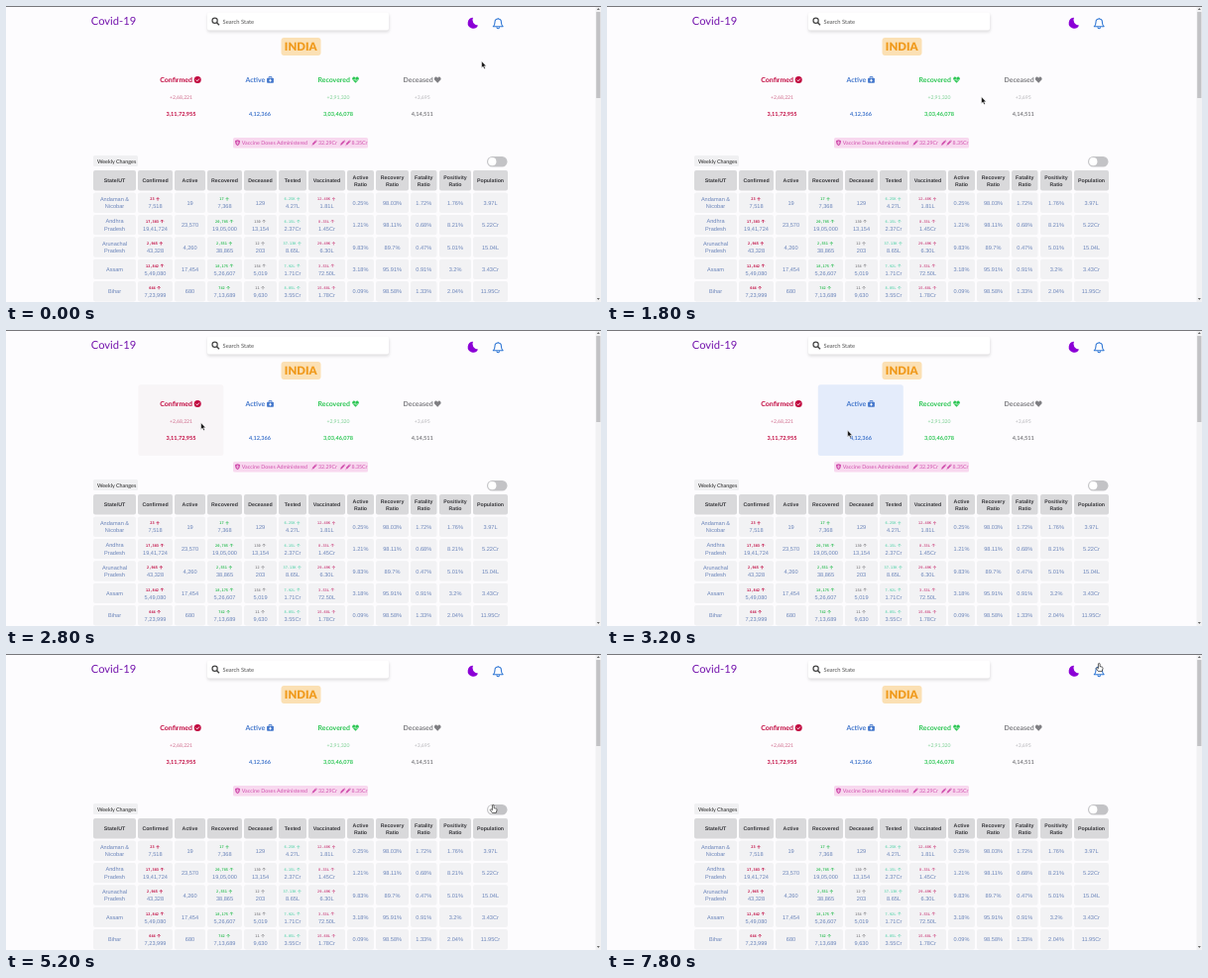
An HTML page for the animation above (8000 ms loop, 600 by 299 pixels).

```html
<!DOCTYPE html>
<html lang="en">
<head>
<meta charset="utf-8">
<title>Covid-19 dashboard</title>
<style>
html, body { margin: 0; width: 100%; height: 100%; overflow: hidden; background: #fdfcfe; }
svg { display: block; width: 100%; height: 100%; font-family: Lato, sans-serif; text-rendering: geometricPrecision; }
.mid { text-anchor: middle; }
.table { font: 5.6px "Liberation Sans", Arial, sans-serif; fill: #6a84ba; }
.head { font-weight: bold; font-size: 5.25px; fill: #38383c; }
.delta { font: bold 3.6px "DejaVu Sans Mono", monospace; }
</style>
</head>
<body>
<svg id="stage" viewBox="0 0 600 299"></svg>
<script>
const LOOP = 8000, STEP = 200;
const RED = '#c1073f', BLUE = '#4377cc', GREEN = '#2bc653', GRAY = '#7f7f83', PINK = '#d04fad';

const text = (x, y, value, attrs = '') => `<text x="${x}" y="${y}" ${attrs}>${value}</text>`;
const rect = (x, y, w, h, fill, rx = 0, attrs = '') =>
  `<rect x="${x}" y="${y}" width="${w}" height="${h}" fill="${fill}" rx="${rx}" ${attrs}/>`;
const path = (d, attrs) => `<path d="${d}" ${attrs}/>`;
const at = (x, y, content, attrs = '') => `<g transform="translate(${x} ${y})" ${attrs}>${content}</g>`;
const style = (size, fill, weight = 400) => `font-size="${size}" fill="${fill}" font-weight="${weight}"`;

const heart = fill => path('M0 3.2L-3.2 0Q-4-2-2.4-2.9Q-.9-3.3 0-1.8Q.9-3.3 2.4-2.9Q4-2 3.2 0Z', `fill="${fill}"`);
const icons = {
  check: `<circle r="3.5" fill="${RED}"/>` + path('M-1.6 0L-.4 1.2L1.7-1.1', 'fill="none" stroke="#fff" stroke-width=".9"'),
  medkit: rect(-3.4, -1.9, 6.8, 5, BLUE, .7) +
    path('M-1.4-2V-3H1.4V-2', `fill="none" stroke="${BLUE}" stroke-width=".9"`) +
    path('M0-.8V2M-1.4.6H1.4', 'stroke="#fff" stroke-width=".9"'),
  pulse: heart(GREEN) + path('M-3.6.2H-1.2L-.4-1.1L.5 1.1L1.1.2H3.6', 'fill="none" stroke="#fff" stroke-width=".5"'),
  heart: heart(GRAY)
};
const syringe = path('M-2.6 2.6L-1.2 1.2M1.2-1.2L2.3-2.3M1.4-2.8L2.8-1.4', `stroke="${PINK}" stroke-width=".6"`) +
  path('M-1.7 1.5L1.4-1.6', `stroke="${PINK}" stroke-width="1.7"`);

// label, centre, label x, icon x, icon, colour, daily, daily colour, total, hover fill
const cards = [
  ['Confirmed', 176.5, 155.3, 193.2, 'check', RED, '+2,68,221', '#cf6b8c', '3,11,72,955', '#f8f5f7'],
  ['Active', 256, 241.5, 266.5, 'medkit', BLUE, '', '', '4,12,366', '#e4ecfb'],
  ['Recovered', 335, 314.5, 352.5, 'pulse', GREEN, '+2,91,320', '#79cf91', '3,03,46,078', '#daf6df'],
  ['Deceased', 419.7, 400.5, 435.2, 'heart', GRAY, '+3,695', '#b4b4b8', '4,14,511', '#f0f0f2']
];

const columns = [
  ['State/UT', 88, 131], ['Confirmed', 133, 168], ['Active', 170, 201], ['Recovered', 203, 238],
  ['Deceased', 240, 273], ['Tested', 275, 303], ['Vaccinated', 305, 342], ['Active Ratio', 344, 371],
  ['Recovery Ratio', 373, 406], ['Fatality Ratio', 408, 434.5], ['Positivity Ratio', 437, 469], ['Population', 471, 506]
];
const states = [
  'Andaman &amp;_Nicobar|7,518|19|7,368|129|4.27L|1.81L|0.25%|98.03%|1.72%|1.76%|3.97L',
  'Andhra_Pradesh|19,41,724|23,570|19,05,000|13,154|2.37Cr|1.45Cr|1.21%|98.11%|0.68%|8.21%|5.22Cr',
  'Arunachal_Pradesh|43,328|4,260|38,865|203|8.65L|6.30L|9.83%|89.7%|0.47%|5.01%|15.04L',
  'Assam|5,49,080|17,454|5,26,607|5,019|1.71Cr|72.50L|3.18%|95.91%|0.91%|3.2%|3.43Cr',
  'Bihar|7,23,999|680|7,13,689|9,630|3.55Cr|1.78Cr|0.09%|98.58%|1.33%|2.04%|11.95Cr'
].map(row => row.split('|'));
const deltaColors = { 1: RED, 3: '#32bf58', 4: '#8c8c90', 5: '#6fd8b6', 6: '#d0568a' };
const deltaColumns = [1, 3, 4, 5, 6];
const weekly = ['23|17||6.25K|12.48K', '17,383|20,785|130|6.15L|8.33L', '2,945|2,551|12|37.13K|29.49K',
  '12,842|18,175|154|7.92L|3.53L', '644|742|11|8.05L|15.68L'];
const daily = ['6|3|||', '1,628|2,744|22|71.15K|', '508|438|1|6.57K|', '1,797|3,128|20|1.18L|', '54|88|1|1.15L|'];

function lines(x, y, value, separator, attrs) {
  const parts = value.split(separator);
  return parts.map((part, i) => text(x, y + 2 + (i - (parts.length - 1) / 2) * 7.4, part, attrs)).join('');
}

function delta(x, y, value, color) {
  const arrow = path('M0 1.6V-1.2M-1.5 0L0-1.5L1.5 0', `fill="none" stroke="${color}" stroke-width=".7"`);
  return text(x - 3, y, value, `class="mid delta" fill="${color}"`) +
    at(x + .4 + value.length * 1.08, y - 1.3, arrow);
}

function table(changes) {
  let out = '';
  columns.forEach(([name, left, right], c) => {
    const x = (left + right) / 2;
    out += rect(left, 166, right - left, 20.6, '#d9d9db', 2) + lines(x, 176.2, name, ' ', 'class="mid head"');
    states.forEach((row, r) => {
      const top = 188.5 + 22.4 * r, y = top + 10.2;
      const change = changes[r].split('|')[deltaColumns.indexOf(c)];
      out += rect(left, top, right - left, 20.4, '#f2f2f4', 2);
      out += change ? delta(x, y - 2.3, change, deltaColors[c]) + text(x, y + 5.6, row[c], 'class="mid"')
                    : lines(x, y, row[c], '_', 'class="mid"');
    });
  });
  return `<g class="table">${out}</g>`;
}

function toggle(on) {
  return rect(88, 151, on ? 39 : 45, 11, '#f0f0f2', 1.5) +
    text(92, 158.5, on ? 'Daily Changes' : 'Weekly Changes', style(5.4, '#222')) +
    rect(485, 152, 20.5, 10.4, on ? '#3474dc' : '#c3c3c6', 5.2) +
    `<circle cx="${on ? 500.2 : 490.3}" cy="157.2" r="4.1" fill="#fff"/>`;
}

const header =
  text(85.8, 19.2, 'Covid-19', style(11.2, '#7414ad')) +
  rect(203, 8, 183.5, 18.5, '#000', 2, 'opacity=".12" filter="url(#blur)"') +
  rect(203, 6.5, 183, 18, '#fff', 2) +
  '<circle cx="210.6" cy="14.8" r="2.6" fill="none" stroke="#444" stroke-width="1.2"/>' +
  path('M212.5 16.7L215 19.2', 'stroke="#444" stroke-width="1.4"') +
  text(218.5, 17.8, 'Search State', style(5.8, '#555')) +
  path('M471 11.8A5.4 5.4 0 1 0 476 19.4A5.2 5.2 0 0 1 471 11.8Z', 'fill="#8b00d6"') +
  path('M491.3 20.7Q493 19.3 493 16.2Q493 13 496.2 13Q499.4 13 499.4 16.2Q499.4 19.3 501.1 20.7ZM496.2 12V13M494.7 21.5Q496.2 24 497.7 21.5',
    'fill="none" stroke="#3278d5" stroke-width="1.1" stroke-linejoin="round"') +
  rect(277.5, 32, 40, 18, '#fbe0b4', 3) +
  text(297.2, 45.3, 'INDIA', 'class="mid" ' + style(11.4, '#f09a1c', 900));

const vaccines =
  rect(229, 133, 136, 10.4, '#f8d8ef', 1.5) +
  path('M233.5 135.2L236 136.1Q236.2 139.8 233.5 141.3Q230.8 139.8 231 136.1Z', `fill="${PINK}"`) +
  path('M233.5 136.4V140M231.9 138H235.1', 'stroke="#f8d8ef" stroke-width=".6"') +
  text(237.8, 140.2, 'Vaccine Doses Administered', style(5.35, PINK)) +
  at(311, 138.3, syringe) + text(315, 140.2, '32.29Cr', style(5.3, PINK)) +
  at(339.5, 138.3, syringe) + at(345, 138.3, syringe) + text(348.6, 140.2, '8.35Cr', style(5.3, PINK));

const scrollbar = rect(0, 0, 600, 1, '#77777b') + rect(594.5, 1, 5.5, 298, '#f1f1f3') +
  rect(595.2, 6, 4.2, 87, '#c2c2c5') + path('M595.8 4L597.3 2L598.8 4Z', 'fill="#666"') +
  path('M595.8 295L597.3 297L598.8 295Z', 'fill="#666"');

const arrowCursor = path('M-.4-1.2V5.4L1.1 4.1L2.2 6.6L3.4 6L2.3 3.7H4.3Z', 'fill="#111" stroke="#fff" stroke-width=".5"');
const handCursor = path('M-.6-3.2Q.3-4.2 1.1-3.2V-.4L3.3.1Q4.2.4 4 1.7L3.3 4.4H-.7L-2.8 1.6Q-2.6.5-1.4 1L-.6 1.7Z',
  'fill="#fff" stroke="#222" stroke-width=".7"');

function card([label, x, labelX, iconX, icon, color, change, changeColor, total, hoverFill], hovered) {
  return (hovered ? rect(x - 43.2, 55.3, 86, 71.7, hoverFill, 2.5) : '') +
    text(labelX, 77, label, style(6.95, color, 700)) + at(iconX, 74.6, icons[icon]) +
    text(x, 94, change, 'class="mid" ' + style(5.1, changeColor)) +
    text(x, 110.5, total, 'class="mid" ' + style(5.6, color, 700));
}

// time, x, y
const route = [[0, 480, 57], [400, 480, 57], [1000, 474, 73], [1400, 454, 82], [1800, 378, 93], [2200, 307, 97],
  [2800, 197, 95], [3000, 196, 95], [3400, 290, 110], [4000, 416, 148], [4800, 474, 156], [5200, 491, 156],
  [6800, 491, 156], [7200, 495, 95], [7600, 496, 13], [8000, 496, 13]];

function pointer(t) {
  const i = route.findIndex(point => point[0] > t);
  const [t0, x0, y0] = route[i - 1], [t1, x1, y1] = route[i];
  const k = (t - t0) / (t1 - t0);
  return [x0 + (x1 - x0) * k, y0 + (y1 - y0) * k];
}

const stage = document.getElementById('stage');
const shadow = '<defs><filter id="blur" x="-10%" y="-40%" width="120%" height="180%"><feGaussianBlur stdDeviation="1.5"/></filter></defs>';
const tables = [table(weekly), table(daily)];
let shown = -1;

function draw(t) {
  const [x, y] = pointer(t);
  const on = t >= 5600 && t < 6800;
  const hovered = y > 55 && y < 127 ? cards.findIndex(c => Math.abs(x - c[1]) < 41) : -1;
  const overToggle = x > 485 && y > 151 && y < 163;
  const overBell = x > 490 && y < 25;
  stage.innerHTML = shadow + rect(0, 0, 600, 299, '#fdfcfe') + header +
    cards.map((c, i) => card(c, i === hovered)).join('') + vaccines + toggle(on) + tables[+on] +
    scrollbar + at(x, y, overToggle || overBell ? handCursor : arrowCursor);
}

function tick(now) {
  const t = Math.floor(now % LOOP / STEP) * STEP;
  if (t !== shown) draw(shown = t);
  requestAnimationFrame(tick);
}
draw(shown = 0);
requestAnimationFrame(tick);
</script>
</body>
</html>
```
